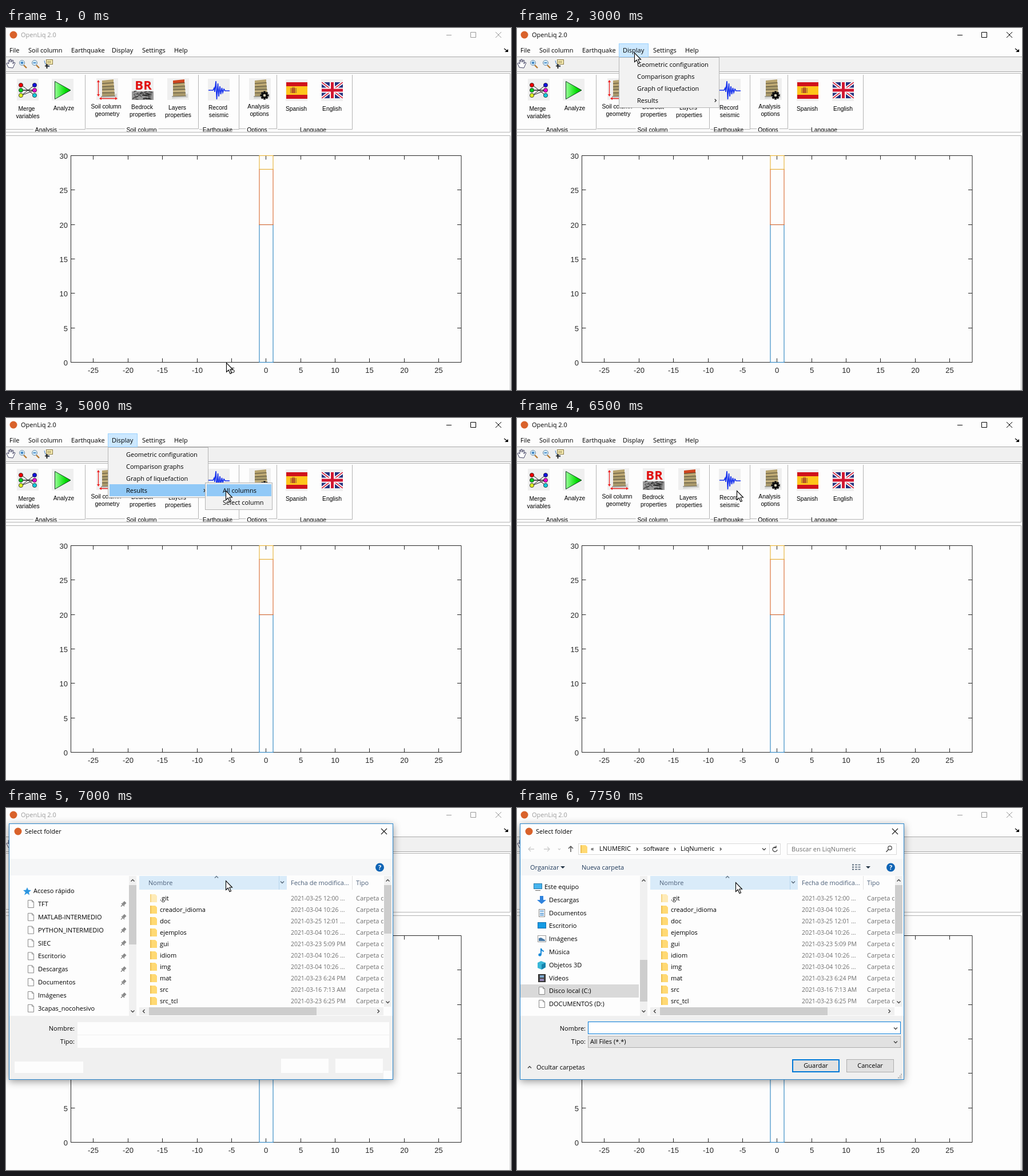
An HTML page for the animation above (8000 ms loop, 883 px wide and 634 px high).

```html
<!DOCTYPE html>
<html lang="en">
<head>
<meta charset="utf-8">
<title>Soil column analysis</title>
<style>
html, body { margin: 0; width: 100%; height: 100%; overflow: hidden; background: #fdfdfd; }
svg { display: block; width: 883px; height: 634px; font: 11px "Open Sans", "Noto Sans", sans-serif; }
.plain { font: 10.3px "Liberation Sans", Arial, sans-serif; text-anchor: middle; }
.ticks { font: 13px "Liberation Sans", Arial, sans-serif; fill: #262626; }
.mid { text-anchor: middle; }
.end { text-anchor: end; }
.date { font-size: 10.4px; fill: #6d6d6d; }
.caption, .menu, .hover, .results, .sub, .all, .dialog, .body, .late, .quick, .pc, .cursor {
  animation: 8s step-end infinite;
}
.caption { animation-name: caption; }
.menu { animation-name: menu; }
.hover { animation-name: hover; }
.results { animation-name: results; }
.sub { animation-name: sub; }
.all { animation-name: all; }
.dialog { animation-name: dialog; }
.body { animation-name: body; }
.late { animation-name: late; }
.quick { animation-name: quick; }
.pc { animation-name: pc; }
.cursor { animation-name: cursor; }
.shadow { filter: drop-shadow(0 3px 7px rgba(0, 0, 0, .4)); }
@keyframes caption { 0%, 84.375%, to { color: #999 } 34.375% { color: #000 } }
@keyframes menu { 0%, 81.25%, to { opacity: 0 } 37.5% { opacity: 1 } }
@keyframes hover { 0%, 46.875%, to { opacity: 0 } 43.75% { opacity: 1 } }
@keyframes results { 0%, 81.25%, to { opacity: 0 } 46.875% { opacity: 1 } }
@keyframes sub { 0%, 81.25%, to { opacity: 0 } 50% { opacity: 1 } }
@keyframes all { 0%, 81.25%, to { opacity: 0 } 62.5% { opacity: 1 } }
@keyframes dialog { 0% { opacity: 0 } 84.375%, to { opacity: 1 } }
@keyframes body { 0% { opacity: 0 } 87.5%, to { opacity: 1 } }
@keyframes late { 0% { opacity: 0 } 90.625%, to { opacity: 1 } }
@keyframes quick { 0%, 96.875%, to { opacity: 0 } 87.5% { opacity: 1 } }
@keyframes pc { 0% { opacity: 0 } 96.875%, to { opacity: 1 } }
@keyframes cursor {
  0% { transform: translate(385px, 586px) }
  3.125% { transform: translate(247px, 228px) }
  6.25% { transform: translate(228px, 137px) }
  9.375% { transform: translate(216px, 106px) }
  12.5% { transform: translate(215px, 86px) }
  15.625% { transform: translate(206px, 53px) }
  18.75% { transform: translate(199px, 38px) }
  21.875% { transform: translate(205px, 43px) }
  43.75% { transform: translate(212px, 86px) }
  46.875% { transform: translate(218px, 124px) }
  56.25% { transform: translate(236px, 127px) }
  59.375% { transform: translate(330px, 128px) }
  62.5% { transform: translate(384px, 127px) }
  96.875%, to { transform: translate(382px, 130px) }
}
</style>
</head>
<body>
<svg id="stage" viewBox="0 0 883 634" xmlns="http://www.w3.org/2000/svg"></svg>
<script>
const text = (x, y, s, a = '') => `<text x="${x}" y="${y}" ${a}>${s}</text>`;
const rect = (x, y, w, h, fill, a = '') => `<rect x="${x}" y="${y}" width="${w}" height="${h}" fill="${fill}" ${a}/>`;
const box = (x, y, w, h, fill, stroke) => rect(x + .5, y + .5, w - 1, h - 1, fill, `stroke="${stroke}"`);
const line = (d, c = '#000', w = 1, a = '') => `<path d="${d}" fill="none" stroke="${c}" stroke-width="${w}" ${a}/>`;
const area = (d, c, a = '') => `<path d="${d}" fill="${c}" ${a}/>`;
const dot = (x, y, r, c, a = '') => `<circle cx="${x}" cy="${y}" r="${r}" fill="${c}" ${a}/>`;
const group = (c, ...parts) => `<g class="${c}">${parts.join('')}</g>`;
const at = (x, y, ...parts) => `<g transform="translate(${x} ${y})">${parts.join('')}</g>`;
const each = (list, f) => list.map(f).join('');

// chevrons: direction in quarter turns, 0 = down
const chevron = (x, y, turn = 0, c = '#444', s = 3) =>
  `<path transform="translate(${x} ${y}) rotate(${turn * 90})" d="M${-s} ${-s / 2}L0 ${s / 2}L${s} ${-s / 2}" fill="none" stroke="${c}" stroke-width="1.4"/>`;

function windowFrame() {
  const names = [[6, 'File'], [39, 'Soil column'], [114, 'Earthquake'], [185, 'Display'], [238, 'Settings'], [294, 'Help']];
  const lens = (x, sign) => line(`M${x + 3} 65l5 5`, '#b5782f', 2.4) +
    dot(x, 61, 4.5, '#d5ecfa', 'stroke="#6d8ba3"') + line(sign, '#1668b5', 1.4);
  return rect(0, 0, 883, 634, '#fdfdfd') + dot(13, 12, 6.5, '#d9622b') +
    group('caption', text(26, 16, 'OpenLiq 2.0', 'fill="currentColor"'),
      line('M770 12.5h9M812.5 7.5h9v9h-9zM856 7l10 10M866 7l-10 10', 'currentColor')) +
    each(names, ([x, s]) => text(x, 43, s)) +
    line('M871 36l5 4', '#000', 1.3) + area('M878 37v5h-6z', '#000') +
    rect(0, 51, 883, 25, '#f0f0f0') + line('M0 50.5H883M0 76.5H883', '#a8a8a8') +
    area('M4 69L1 62l2-1 2 2-1-6 2-1 1 4 0-5h2l1 5 1-4 2 1-1 6 2-3 2 1-4 9z', '#fff', 'stroke="#335" stroke-width=".9"') +
    lens(28, 'M25.5 61h5M28 58.5v5') + lens(50, 'M47.5 61h5') +
    box(70, 55, 12, 9, '#f8edb4', '#8a7a45') + line('M72 58.5h7M72 60.5h7', '#8a7a45', .8) +
    line('M67 57q1 9 9 11', '#447fc0') + line('M68 66.5h8M71.5 63v8', '#000', 1.6);
}

function soil(x, y, top) {
  const tones = [top, '#bda873', '#a99a6b', '#c0ad7d', '#aa996a'];
  return at(x, y, rect(0, 0, 38, 38, '#efefef'), area('M10 30l26-3v7l-28 2z', '#d4d5d3'),
    each(tones, (c, i) => area(`M10 ${4 + i * 5.4}L${30 + i * .5} ${2 + i * 5.8}v6L10 ${10 + i * 5.4}z`, c)),
    each([1, 2, 3, 4], i => line(`M10 ${4 + i * 5.4}L${30 + i * .5} ${2 + i * 5.8}`, '#3f3b2d', .9)),
    line('M8 32l25-1', '#55534a', .8));
}

function bedrock() {
  let seed = 7, d = '';
  const rnd = () => (seed = seed * 16807 % 2147483647) / 2147483647;
  for (let i = 0; i < 55; i++) d += `M${1 + rnd() * 30} ${23 + rnd() * 14}l${2 + rnd() * 5} ${rnd() * 3 - 1.5}`;
  return at(220, 88, rect(0, 0, 38, 38, '#efefef'), rect(0, 23, 38, 15, '#999'), line(d, '#222', .9),
    text(20, 20, 'BR', 'class="mid" fill="#e00b0b" style="font:bold 22px \'Open Sans\',sans-serif"'));
}

function gear(x, y) {
  return at(x, y, each([0, 1, 2, 3], i => `<path d="M-7.5 0H7.5" stroke="#111" stroke-width="3.6" transform="rotate(${i * 45})"/>`),
    dot(0, 0, 4, '#d9d2bb', 'stroke="#111" stroke-width="3.4"'));
}

function icons() {
  const left = ['#e00', '#0c2', '#de2'], right = ['#11d', '#e0c', '#1cd'];
  const links = each([0, 1, 2], i => line(`M27 ${100 + i * 9}L50 ${118 - i * 9}`, '#222'));
  const ends = (x, list) => each(list, (c, i) => dot(x, 100 + i * 9, 3.6, c, 'stroke="#222" stroke-width=".8"'));
  return `<linearGradient id="play"><stop stop-color="#9f9"/><stop offset=".7" stop-color="#0d0"/><stop offset="1" stop-color="#0a0"/></linearGradient>` +
    rect(19, 89, 38, 38, '#efefef') + links + line('M27 109H50M27 118L50 109', '#222') + ends(26, left) + ends(50, right) +
    rect(80, 89, 38, 38, '#efefef') + area('M85.500 93.500L113 109 85.500 124.500z', 'url(#play)', 'stroke="#142" stroke-width="1"') +
    soil(158, 88, '#b7a36f') + line('M161.500 92V118M164 123.500H193', '#e22', 1.3) +
    area('M159 95l2.500-4 2.500 4zM159 116l2.500 4 2.500-4zM167 121l-4 2.500 4 2.500zM191 121l4 2.500-4 2.500z', '#e22') +
    bedrock() + soil(282, 88, '#cf4620') +
    rect(353, 89, 38, 38, '#efefef') +
    line('M354 109h8l2-4 1 7 2-19 1.500 32 2-28 1.500 23 2-18 1.500 14 2-11 1.500 8 2-6 2 3h8', '#1430ee', 1.6) +
    soil(425, 88, '#b7a36f') + gear(452, 118) +
    rect(489, 90, 38, 38, '#efefef') + rect(490, 95, 37, 29, '#d0121b') + rect(490, 102, 37, 15, '#ffc51c') +
    rect(499, 105, 7, 9, '#b65a24') + line('M497.500 105v9M507.500 105v9M500 104h5', '#9a6a35') +
    rect(551, 90, 38, 38, '#efefef') +
    `<svg x="552" y="95" width="37" height="28" viewBox="0 0 37 28">` + rect(0, 0, 37, 28, '#25337d') +
    line('M0 0L37 28M37 0L0 28', '#fff', 5) + line('M0 0L37 28M37 0L0 28', '#d21832', 1.6) +
    line('M18.500 0V28M0 14H37', '#fff', 9) + line('M18.500 0V28M0 14H37', '#d21832', 5) + '</svg>';
}

function ribbon() {
  const panels = [[0, 138, 70, 'Analysis', 177], [140, 336, 237, 'Soil column', 176], [338, 407, 370, 'Earthquake', 177],
    [408, 473, 439, 'Options', 176], [475, 605, 537, 'Language', 177]];
  const labels = [[36, 145, 'Merge'], [38, 158, 'variables'], [101, 144, 'Analyze'], [175, 141, 'Soil column'], [177, 154, 'geometry'],
    [238, 142, 'Bedrock'], [239, 155, 'properties'], [299.5, 143, 'Layers'], [301, 156, 'properties'], [370.5, 143, 'Record'],
    [372, 156, 'seismic'], [441.5, 141, 'Analysis'], [443, 154, 'options'], [507.5, 145, 'Spanish'], [570, 145, 'English']];
  return line('M0 79.500H881.500V182.500H0M0 188.500H881.500V634', '#b4b4b4') +
    `<clipPath id="cut"><path d="M0 165H883V181.500H0z"/></clipPath>` +
    each(panels, ([a, b, c, s, y]) => {
      const half = s.length * 2.4 + 3;
      return line(`M${a} ${y + .5}H${c - half}M${c + half} ${y + .5}H${b + .5}V82`, '#b4b4b4') +
        `<g clip-path="url(#cut)">${text(c, 182, s, 'class="plain"')}</g>`;
    }) + icons() + group('plain', each(labels, l => text(...l)));
}

function chart() {
  const X = v => 454.7 + v * 12.07, Y = v => 585.5 - v * 12.067;
  let d = 'M113.500 223.500H796V585.500H113.500z', labels = '';
  for (let v = -25; v <= 25; v += 5) {
    const x = Math.floor(X(v)) + .5;
    d += `M${x} 585.500v-7M${x} 223.500v7`;
    labels += text(x, 604, v, 'class="mid"');
  }
  for (let v = 0; v <= 30; v += 5) {
    const y = Math.floor(Y(v)) + .5;
    d += `M113.500 ${y}h7M796 ${y}h-7`;
    labels += text(108, y + 5.5, v, 'class="end"');
  }
  const layer = (lo, hi, c) => {
    const y = Math.floor(Y(hi)) + .5;
    return rect(443, y, 24, Math.floor(Y(lo)) + .5 - y, 'none', `stroke="${c}" stroke-width="1.1"`);
  };
  return line(d, '#262626') + group('ticks', labels) +
    layer(0, 20, '#2a83c0') + layer(20, 28, '#d9692f') + layer(28, 30, '#e8b338');
}

function menus() {
  const items = ['Geometric configuration', 'Comparison graphs', 'Graph of liquefaction', 'Results'];
  return group('menu', box(178, 27, 52, 24, '#cce8ff', '#99d1ff'), text(185, 43, 'Display'), box(178, 51, 176, 89, '#f2f2f2', '#b5b5b5')) +
    group('hover', rect(181, 75, 170, 21, '#91c9f7')) + group('results', rect(181, 116, 170, 21, '#91c9f7')) +
    group('menu', each(items, (s, i) => text(210, 68 + i * 21, s)), chevron(347, 127, 3, '#333', 2.5)) +
    group('sub', box(348, 113, 118, 48, '#f2f2f2', '#b5b5b5')) + group('all', rect(351, 116, 113, 21, '#91c9f7')) +
    group('sub', text(379, 131, 'All columns'), text(379, 152, 'Select column'));
}

const sheet = (x, y) => area(`M${x + .5} ${y - 6.5}h7l3 3v10h-10z`, '#fff', 'stroke="#888"') + line(`M${x + 7.5} ${y - 6.5}v3h3`, '#888');
const folder = (x, y, a = '') => area(`M${x} ${y - 7}h9l3 3v11h-12z`, '#ffd973', a) + rect(x, y - 7, 2, 14, '#eebf4f', a);
const thumb = (x, y, w, h) => rect(x, y, w, h, '#cdcdcd');

function quickAccess() {
  const names = ['TFT', 'MATLAB-INTERMEDIO', 'PYTHON_INTERMEDIO', 'SIEC', 'Escritorio', 'Descargas', 'Documentos', 'Imágenes', '3capas_nocohesivo'];
  return area('M37 139l2 4.500 5 .5-4 3.500 1 5-4-3-5 3 2-5-4-3.500 5-.5z', '#2c96e0') + text(48, 149, 'Acceso rápido') +
    each(names, (s, i) => {
      const y = 168 + i * 22.85;
      return sheet(38, y) + text(56, y + 4, s) +
        (i < 8 ? at(205, y, line('M-4 4.500L-1 1.500M-3-1L2 4', '#777', 1.3), area('M-2-1l4-4 3.500 3.500-4 4z', '#8a8a8a')) : '');
    }) + thumb(215, 135, 13, 104);
}

function thisPc() {
  const names = ['Este equipo', 'Descargas', 'Documentos', 'Escritorio', 'Imágenes', 'Música', 'Objetos 3D', 'Vídeos', 'Disco local (C:)', 'DOCUMENTOS (D:)'];
  const art = [
    box(-7, -6, 15, 10, '#46b4ee', '#2a7cac') + line('M-4 6.500h9', '#666'),
    area('M-3-7h6v7h5l-8 7-8-7h5z', '#2f83dd'),
    box(-5, -7, 11, 14, '#fff', '#888') + line('M-3-3.500h7M-3 .5h7M-3 3.500h7', '#3a87cc', 1.5),
    box(-7, -6, 15, 11, '#159be4', '#0b6daf'),
    box(-7, -6, 15, 12, '#fff', '#999') + area('M-5 4v-5l4-1 7 4v2z', '#4779a5'),
    line('M-1 5V-6q1 4 5 5', '#1689d8', 2) + dot(-3, 5, 2.6, '#1689d8'),
    area('M-7-4l6-3 8 3v8l-7 4-7-3z', '#39b8d8') + area('M0-1l7-3v8l-7 4z', '#1683ad'),
    box(-6, -7, 13, 14, '#444', '#222') + rect(-3, -5, 7, 4, '#7eaad1') + rect(-3, 1, 7, 4, '#9385b8')
  ];
  return rect(6, 309, 207, 23, '#d9d9d9') + each(names, (s, i) => {
    const y = 138 + i * 22.8;
    return (i < 8 ? at(i ? 43 : 36, Math.round(y), art[i]) : sheet(38, Math.round(y))) + text(i ? 56 : 48, y + 4, s);
  }) + thumb(215, 266, 13, 73);
}

function fileList() {
  const rows = [['.git', '25 12:00 ...'], ['creador_idioma', '04 10:26 ...'], ['doc', '25 12:01 ...'], ['ejemplos', '04 10:26 ...'],
    ['gui', '23 5:09 PM'], ['idiom', '04 10:26 ...'], ['img', '04 10:26 ...'], ['mat', '23 6:24 PM'], ['src', '16 7:13 AM'], ['src_tcl', '23 6:25 PM']];
  const head = 'fill="#4c607a"';
  return rect(233, 119, 258, 24, '#d9ebf9') + line('M477.500 119v24', '#b4d5ee') + line('M605.500 119v24', '#e2e2e2') +
    text(249, 135, 'Nombre', head) + text(498, 135, 'Fecha de modifica...', head) + text(612, 135, 'Tipo', head) +
    chevron(368, 121, 2, '#678') + chevron(483, 130, 0, '#567') +
    `<clipPath id="cols"><path d="M233 143H660V347H233z"/></clipPath><g clip-path="url(#cols)">` +
    each(rows, ([s, d], i) => {
      const y = 158 + i * 20;
      return folder(252, y, i ? '' : 'opacity=".5"') + text(269, y + 4, s) +
        text(498, y + 4, '2021-03-' + d, 'class="date"') + text(612, y + 4, 'Carpeta d', 'fill="#6d6d6d"');
    }) + '</g>' +
    rect(661, 119, 13, 229, '#f0f0f0') + thumb(661, 135, 13, 85) + chevron(667.5, 127, 2) + chevron(667.5, 340) +
    rect(233, 349, 427, 14, '#f0f0f0') + thumb(250, 349, 293, 14) + chevron(241, 356, 1) + chevron(651, 356, 3);
}

function controls() {
  const steps = [[144, 'LNUMERIC', 210], [221, 'software', 276], [286, 'LiqNumeric', 356]];
  const down = (x, y) => area(`M${x - 4} ${y - 2}h8l-4 4z`, '#234');
  return line('M30 72H20M24 68l-4 4 4 4M47 72h10M53 68l4 4-4 4', '#ccc', 1.3) + chevron(74, 72, 0, '#ccc', 2) +
    line('M94 77V67M90 71l4-4 4 4', '#555', 1.5) +
    box(107, 62, 354, 20, '#fff', '#d9d9d9') + folder(111, 72) + text(129, 75, '«') +
    each(steps, ([x, s, c]) => text(x, 75, s) + chevron(c, 72, 3, '#444', 2.2)) +
    chevron(432, 72) + line('M441.500 63v18', '#d9d9d9') + line('M453 69a4 4 0 1 0 2 4M453 66v3.500h-3.500', '#444', 1.3) +
    box(472, 62, 192, 20, '#fff', '#d9d9d9') + text(480, 76, 'Buscar en LiqNumeric', 'fill="#6d6d6d"') +
    dot(652, 70, 3.3, 'none', 'stroke="#444" stroke-width="1.2"') + line('M649.500 72.500l-4 4.500', '#444', 1.4) +
    text(23, 108, 'Organizar', 'fill="#1e395b"') + down(80, 104) + text(113, 108, 'Nueva carpeta', 'fill="#1e395b"') +
    line('M586 99.500h3M586 103.500h3M586 107.500h3', '#567', 2) + line('M591 99.500h11M591 103.500h11M591 107.500h11', '#567', 1.5, 'stroke-dasharray="4 1.500"') + down(614, 104) +
    rect(15, 444, 121, 21, '#f0f0f0') + rect(480, 438, 196, 37, '#f0f0f0') +
    box(124, 374, 547, 22, '#fff', '#0078d7') + box(124, 399, 547, 21, '#e1e1e1', '#adadad') +
    text(128, 413, 'All Files (*.*)') + chevron(662, 386) + chevron(662, 410) +
    chevron(22, 454, 2) + text(34, 458, 'Ocultar carpetas') +
    rect(482, 441, 81, 21, '#e1e1e1', 'stroke="#0078d7" stroke-width="2"') + text(522.5, 455, 'Guardar', 'class="mid"') +
    box(576, 440, 83, 23, '#e1e1e1', '#adadad') + text(617.5, 455, 'Cancelar', 'class="mid"') +
    line('M666 472.500h7M669 469.500h4M671 466.500h2', '#aaa', 2, 'stroke-dasharray="2 1"');
}

function dialog() {
  const blanks = [[125, 375, 545, 22], [125, 398, 545, 22], [15, 444, 120, 20], [481, 439, 83, 25], [576, 439, 83, 25], [660, 460, 15, 15]];
  return group('body', rect(5, 27, 672, 449, '#fff', 'class="shadow"')) +
    group('dialog', box(5, 27, 672, 449, '#fdfdfd', '#2a86cc'), dot(21, 41, 6.5, '#d9622b'), text(33, 45, 'Select folder'),
      line('M656 36l10 10M666 36l-10 10', '#222', 1.2), rect(6, 364, 670, 111, '#f0f0f0')) +
    group('body', rect(6, 89, 670, 29, '#f5f6f7'), dot(653.5, 104, 7.5, '#0f64b5'),
      text(653.5, 108, '?', 'class="mid" fill="#fff" font-weight="700"'),
      rect(215, 119, 13, 245, '#f0f0f0'), chevron(221.5, 127, 2), chevron(221.5, 356), fileList(),
      each(blanks, b => rect(...b, '#fdfdfd')), text(120, 390, 'Nombre:', 'class="end"'), text(120, 413, 'Tipo:', 'class="end"')) +
    group('quick', quickAccess()) + group('pc', thisPc()) + group('late', controls());
}

const pointer = group('cursor', area('M.5 .5V16.500L4.200 13 7 19.500 9.500 18.400 6.800 12H11.500z', '#fff', 'stroke="#000" stroke-width="1.100"'));
document.getElementById('stage').innerHTML = windowFrame() + ribbon() + chart() + menus() + dialog() + pointer;
</script>
</body>
</html>
```
